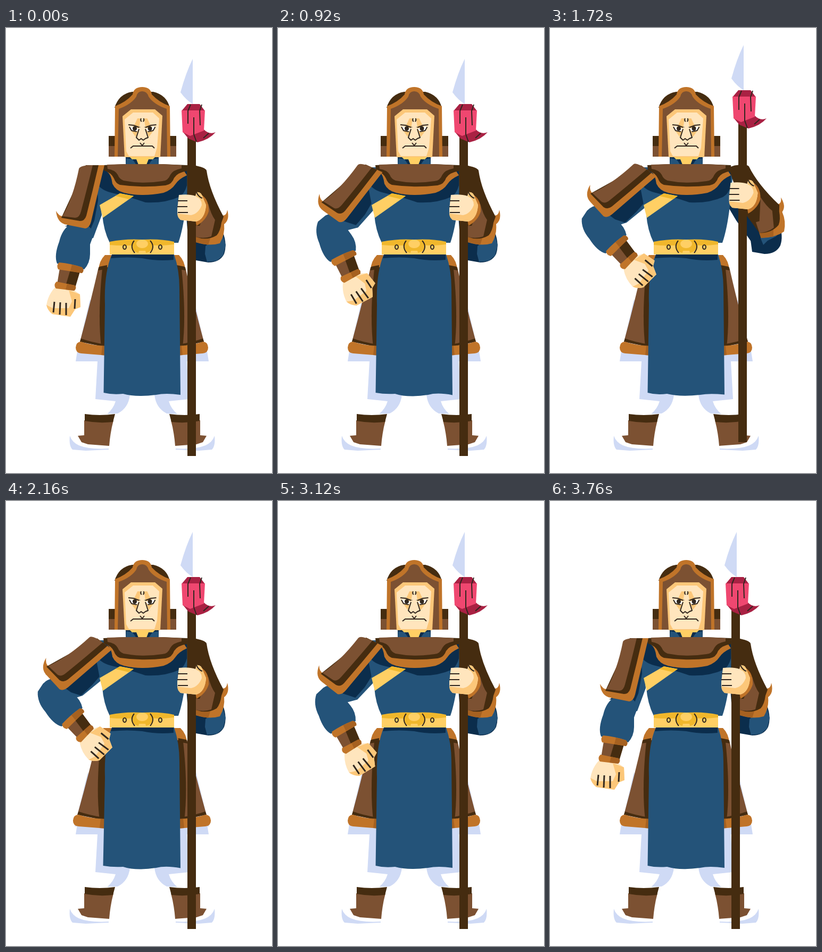
Recreate the animation shown at these times as an HTML page. Size 500 px wide and 837 px high, loop 3.8 s.

```html
<!DOCTYPE html>
<html lang="en">
<head>
<meta charset="utf-8">
<title>Guard</title>
<style>
html, body { margin: 0; width: 100%; height: 100%; overflow: hidden; background: #fff; }
svg { display: block; width: 500px; height: 837px; }
.blue { fill: #245379; } .navy { fill: #0b2d4c; }
.brown { fill: #7c5132; } .dark { fill: #452c10; }
.orange { fill: #c07429; } .rust { fill: #a66120; }
.yellow { fill: #ffcf64; } .gold { fill: #f0b72c; }
.skin { fill: #ffe5bd; } .tan { fill: #fcc779; }
.pale { fill: #cfdaf5; } .white { fill: #fff; }
.pink { fill: #ef4770; } .wine { fill: #a92143; }
.ink { fill: #30271f; }
.line { fill: none; stroke: #30271f; stroke-width: 2; stroke-linejoin: round; }
.thick { stroke-width: 3; }
</style>
</head>
<body>
<svg viewBox="0 0 500 837">
<defs>
  <g id="leg">
    <path class="pale" d="M134 608L131 627H172L168 698L206 702Q202 716 190 726L210 725Q230 715 233 690L256 680V608Z"/>
    <path class="brown" d="M147 738L202 738Q196 760 194 786L154 783L142 779L135 767L147 766Z"/>
    <path class="dark" d="M148 726Q176 730 205 726L201 741Q174 744 148 739Z"/>
    <path class="pale" d="M120 767Q118 786 125 793L150 795L193 793V791Q156 793 137 785Q124 779 120 767Z"/>
  </g>
  <g id="panel">
    <path class="pale" d="M158 510L134 612H180Z"/>
    <path class="brown" d="M174 450H200V602L139 590Q158 520 174 450Z"/>
    <path class="dark" d="M181 453L198 445V600H179Q172 540 181 453Z"/>
    <path class="dark" d="M141 584Q160 591 186 595V600L139 590Z"/>
    <path class="orange" d="M186 427H204V450H188L174 455Q175 438 186 427Z"/>
    <path class="dark" d="M175 449L190 446V453L173 456Z"/>
    <path class="orange" d="M141 590Q160 597 190 598V616L141 612Q131 611 131 601Q132 590 141 590Z"/>
    <path class="rust" d="M181 598H190V616L179 615Z"/>
  </g>
  <g id="eye">
    <path class="tan" d="M236 194L247 170H253L250 190L244 205Z"/>
    <path class="white" d="M233 185L250 189L246 195L236 193Z"/>
    <circle class="ink" cx="242" cy="189" r="4"/>
    <path class="line" d="M230 182L240 183L253 188M232 186L236 193L246 195M255 176Q252 174 254 170"/>
  </g>
</defs>

<use href="#leg"/>
<use href="#leg" transform="matrix(-1 0 0 1 512 0)"/>
<g id="skirt">
  <use href="#panel"/>
  <use href="#panel" transform="matrix(-1 0 0 1 511 0)"/>
</g>
<path id="apron" class="blue"/>
<path class="navy" d="M200 424H315V436Q284 439 256 433Q228 430 197 433Z"/>

<polygon id="armLit" class="blue"/>
<polygon id="armShade" class="navy"/>
<polygon id="farArm" class="navy"/>

<path class="blue" d="M166 262H345L338 335Q333 378 324 404H195Q183 380 181 350L176 332L169 295Z"/>
<path class="navy" d="M170 266V291Q178 306 203 311Q240 320 262 328Q298 330 325 318Q336 312 340 296V266Z"/>
<path class="yellow" d="M176 333L214 311L240 316L182 357Z"/>
<path class="gold" d="M206 316L214 311L240 316L231 322Z"/>
<path class="yellow" d="M195 402Q225 408 256 402Q288 408 316 402V426H195Z"/>
<path class="gold" d="M195 402Q225 396 256 398Q290 396 316 402V407Q288 411 256 407Q225 411 195 408Z"/>
<ellipse class="gold" cx="256" cy="411" rx="20" ry="13"/>
<ellipse class="yellow" cx="256" cy="406" rx="11" ry="8"/>
<path class="yellow" d="M248 426L250 419H262L264 426Z"/>
<path class="line" d="M241 400Q232 411 242 423M271 400Q281 411 271 423"/>
<ellipse class="line" cx="223" cy="412" rx="3" ry="4"/>
<ellipse class="line" cx="290" cy="412" rx="3" ry="4"/>

<path class="navy" d="M225 241H287V257H225Z"/>
<path class="blue" d="M226 245L238 247L244 256H225ZM286 245L275 247L269 256H287Z"/>
<path class="yellow" d="M232 242H281L276 247H268L264 257H249L245 247H237Z"/>

<path class="orange" d="M190 270Q198 276 200 293Q206 306 222 310Q256 318 296 310Q311 305 319 293Q325 284 340 277L330 262H195Z"/>
<path class="dark" d="M183 258L225 256H292L340 258V269Q322 272 316 282Q312 294 300 296Q256 301 214 295Q206 292 203 283Q198 272 184 268Z"/>
<path class="brown" d="M190 257L225 256H292L330 258V264Q314 267 309 276Q304 288 294 288Q256 294 221 287Q213 284 210 276Q205 267 191 265Z"/>

<path class="dark" d="M204 150Q212 124 237 120H277Q302 126 308 150Z"/>
<path class="dark" d="M193 203H320V222H193Z"/>
<path class="brown" d="M193 222H320V242H193Z"/>
<path class="orange" d="M205 147Q226 139 238 125Q240 111 256 111Q272 111 274 125Q288 140 308 147L309 242H204Z"/>
<path class="brown" d="M212 152Q235 144 245 129Q247 119 256 119Q265 119 268 129Q278 144 302 152L303 242H210Z"/>
<path class="tan" d="M219 166L235 153H280L294 165L290 243H223Z"/>
<path class="skin" d="M223 172L239 159H276L288 170L284 225L279 241H231L226 232Z"/>
<use href="#eye"/>
<use href="#eye" transform="matrix(-1 0 0 1 512.5 0)"/>
<path class="skin" d="M250 187H262L267 207L257 213L245 207Z"/>
<path class="line" d="M250 190L245 206L250 211L254 208L258 211L262 208L267 206L262 190M252 216L256 221L260 216M234 226L239 222H275L279 226"/>

<g id="fore">
  <path class="blue" d="M122 368Q105 379 100 402Q90 428 96 443L147 454Q158 442 158 425V407L165 388Q160 370 140 367Z"/>
  <path class="skin" d="M92 488L126 492L139 501L140 525L130 529L121 543L87 538Q78 531 76 521Q79 502 92 488Z"/>
  <path class="tan" d="M118 493L139 501L140 525L130 529L121 543L87 538Q78 531 76 521L88 527H118L124 514Z"/>
  <path class="line thick" d="M130 510L129 528M113 517V540M102 516L101 539M91 515L89 535"/>
  <path class="brown" d="M101 452L139 458L130 488L96 482Z"/>
  <path class="dark" d="M121 455L139 458L130 488L112 485Z"/>
  <path class="orange" d="M100 441Q122 443 143 450Q148 456 143 461L98 454Q94 446 100 441ZM95 477L129 484Q134 489 128 494L94 490Q88 483 95 477Z"/>
  <path class="rust" d="M124 445L143 450Q148 456 143 461L121 457ZM115 481L129 484Q134 489 128 494L112 492Z"/>
</g>
<g id="pauldron">
  <path class="orange" d="M150 258H185Q172 312 160 364Q157 376 149 377L114 370Q96 367 94 344Q100 355 108 354Z"/>
  <path class="dark" d="M150 258H174Q163 306 151 353Q148 363 139 363L104 357Z"/>
  <path class="brown" d="M137 265Q139 258 163 258Q153 300 141 345Q138 357 130 357L106 354Q126 320 137 265Z"/>
</g>

<g id="farSleeve">
  <path class="navy" d="M350 385L408 385Q416 407 410 425Q402 441 380 441L357 437Z"/>
  <polygon id="farLight" class="blue"/>
</g>
<g id="farPauldron">
  <path class="orange" d="M400 350Q414 358 416 342Q421 361 410 369Q412 388 402 405Q382 411 357 403V380Z"/>
  <path class="rust" d="M357 390H386L380 408L357 403Z"/>
  <path class="dark" d="M340 258H352Q375 262 377 268Q382 305 409 355L405 366Q403 382 396 390Q378 401 357 393L341 345Z"/>
  <path class="brown" d="M364 372L380 330Q385 350 393 361L386 392Q372 397 357 393V372Z"/>
</g>
<g id="spear">
  <path class="dark" d="M341 200H357V805H341Z"/>
  <path class="pale" d="M351 58V143Q338 135 328 121Q338 84 351 58Z"/>
  <path class="wine" d="M330 156L341 143H364L374 156ZM332 195L372 191Q382 201 394 196Q382 210 360 215L343 208Z"/>
  <path class="pink" d="M330 155H374L372 193L346 203L332 196Z"/>
  <path class="line" d="M347 144L342 156V180M368 144L364 156L365 183M353 168V200L358 214M371 207L381 198"/>
</g>
<g id="fist">
  <path class="orange" d="M362 311Q382 319 381 345Q376 362 358 372L354 350Z"/>
  <path class="skin" d="M325 314Q344 312 356 316L358 309Q367 307 370 319L376 333Q374 360 357 364L328 361Q321 354 322 340Z"/>
  <path class="tan" d="M358 309Q367 307 370 319L376 333Q374 360 357 364L328 361Q322 356 322 349L348 352Q362 349 368 333Q368 321 357 317Z"/>
  <path class="line" d="M323 325H341M322 336H341M323 347H342M358 309Q362 318 369 320"/>
</g>
</svg>
<script>
const LOOP = 3800;
const el = Object.fromEntries([...document.querySelectorAll('[id]')].map(e => [e.id, e]));

// Pairs of outlines: arm at rest, arm moved.
const armLit = [
  [115, 370, 165, 285, 178, 330, 180, 352, 164, 395, 120, 400],
  [75, 352, 165, 290, 184, 320, 182, 335, 144, 366, 100, 380]];
const armShade = [
  [111, 373, 140, 360, 165, 295, 172, 295, 173, 325, 166, 362, 158, 381, 148, 377],
  [78, 344, 100, 340, 165, 295, 182, 300, 183, 322, 162, 346, 141, 366, 104, 354]];
const farArm = [
  [338, 290, 380, 300, 400, 400, 357, 432, 341, 380, 338, 340],
  [335, 295, 385, 300, 415, 385, 384, 410, 350, 362, 334, 335]];
const farLight = [
  [375, 410, 407, 388, 413, 408, 408, 428, 396, 438, 378, 440, 374, 425],
  [373, 398, 412, 372, 413, 392, 402, 408, 386, 416, 378, 424, 373, 412]];

const clamp = x => Math.min(1, Math.max(0, x));
const span = (t, a, b) => clamp((t - a) / (b - a));
const ease = x => (1 - Math.cos(Math.PI * x)) / 2;
const move = (e, value) => e.setAttribute('transform', value);
const blend = (e, [a, b], k) => e.setAttribute('points', a.map((v, i) => v + (b[i] - v) * k).join(' '));

function around(x, y, deg) {
  const r = deg * Math.PI / 180, c = Math.cos(r), s = Math.sin(r);
  return (px, py) => [x + (px - x) * c - (py - y) * s, y + (px - x) * s + (py - y) * c];
}

function draw(t) {
  const arm = ease(span(t, 400, 1245)) - ease(span(t, 2840, 3660));
  const lift = ease(span(t, 1180, 1700)) - span(t, 1740, 2020) ** 2;
  const flare = ease(span(t, 1980, 2180)) - ease(span(t, 2240, 2800));
  const wave = Math.sin(t / LOOP * Math.PI * 6);

  const turn = 36 * arm;
  const [ex, ey] = around(160, 291, turn)(138.7, 388);
  move(el.pauldron, `rotate(${turn} 160 291)`);
  move(el.fore, `translate(${ex} ${ey}) rotate(${-53.5 * arm}) translate(-138.7 -388)`);
  blend(el.armLit, armLit, arm);
  blend(el.armShade, armShade, arm);

  move(el.spear, `translate(${13 * lift} ${-26 * lift})`);
  move(el.fist, `translate(${14.5 * lift} ${-23 * lift})`);
  move(el.farSleeve, `translate(${23 * lift} ${-16 * lift})`);
  move(el.farPauldron, `rotate(${-18 * lift} 351 274)`);
  blend(el.farArm, farArm, lift);
  blend(el.farLight, farLight, lift);

  move(el.skirt, `translate(255.5 0) scale(${1 + .042 * flare} 1) translate(-255.5 0)`);
  el.apron.setAttribute('d', `M199 426H316Q326 455 326 490L328 ${690 - wave / 2}` +
    `Q300 ${686 + wave} 282 690Q244 ${695 - wave} 220 688Q200 ${690 + wave} ${183.5 - flare} 686` +
    `L186 520Q184 460 199 426Z`);
}

function tick() {
  draw(performance.now() % LOOP);
  requestAnimationFrame(tick);
}
tick();
</script>
</body>
</html>
```
